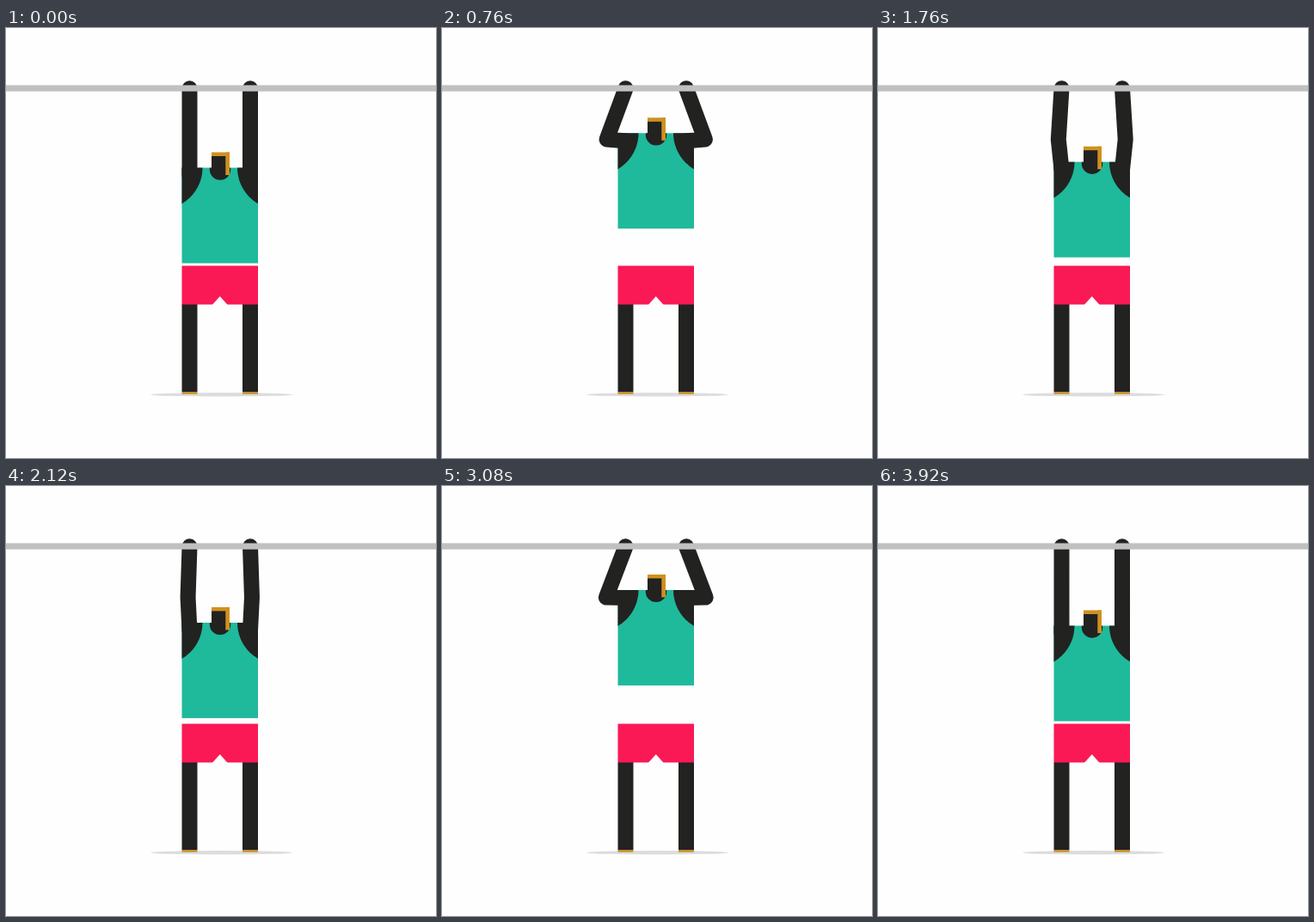
An HTML page with a canvas for the animation above (4 s loop, 500x500 px).

```html
<!DOCTYPE html>
<html lang="en">
<head>
<meta charset="utf-8">
<title>Pull-ups</title>
<style>
  html, body { margin: 0; width: 100%; height: 100%; overflow: hidden; background: #fefefe; }
  canvas { display: block; }
</style>
</head>
<body>
<canvas id="stage" width="500" height="500"></canvas>
<script>
const ctx = document.getElementById('stage').getContext('2d');
const LOOP = 4000, STEP = 40, REP = 59000 / 30;
const LIFT = 42.2, ELBOW_OUT = 23;
const LEFT = 204.5, RIGHT = 293, MID = (LEFT + RIGHT) / 2, LIMB = 18;
const SKIN = '#222221', SHIRT = '#1fb99c', SHORTS = '#fa1955',
      GOLD = '#cf911f', BAR = '#c0c0c0', SHADOW = '#dcdcdc', PAPER = '#fefefe';

const bezier = (s, a, b) => 3 * (1 - s) * (1 - s) * s * a + 3 * (1 - s) * s * s * b + s * s * s;

// Cubic ease with both handles at x = 0.34.
function ease(x) {
  let lo = 0, hi = 1;
  for (let i = 0; i < 30; i++) {
    const s = (lo + hi) / 2;
    if (bezier(s, 0.34, 0.34) < x) lo = s; else hi = s;
  }
  return bezier(lo, 0, 1);
}

function pullAt(t) {
  if (t >= 2 * REP) return 0;
  const phase = (t % REP) / REP;
  return ease(1 - Math.abs(2 * phase - 1));
}

function rect(color, x, y, w, h) {
  ctx.fillStyle = color;
  ctx.fillRect(x, y, w, h);
}

function disc(color, x, y, rx, ry = rx) {
  ctx.fillStyle = color;
  ctx.beginPath();
  ctx.ellipse(x, y, rx, ry, 0, 0, 2 * Math.PI);
  ctx.fill();
}

function polygon(color, points) {
  ctx.fillStyle = color;
  ctx.beginPath();
  points.forEach(([x, y]) => ctx.lineTo(x, y));
  ctx.fill();
}

function drawLegs() {
  disc(SHADOW, 250.5, 426.3, 82.5, 2.2);
  for (const x of [LEFT, RIGHT - LIMB]) {
    rect(SKIN, x, 321, LIMB, 102.5);
    rect(GOLD, x, 423.5, LIMB, 2.2);
  }
  rect(SHORTS, LEFT, 276.5, RIGHT - LEFT, 45);
  polygon(PAPER, [[MID, 312], [MID + 9, 322], [MID - 9, 322]]);
}

function drawTorso(top) {
  const height = 111;
  rect(SHIRT, LEFT, top, RIGHT - LEFT, height);
  ctx.save();
  ctx.beginPath();
  ctx.rect(LEFT, top, RIGHT - LEFT, height);
  ctx.clip();
  disc(SKIN, LEFT - 24.5, top, 48.5);
  disc(SKIN, RIGHT + 24.5, top, 48.5);
  disc(SKIN, 249, top + 2, 12.2);
  ctx.restore();
  rect(SKIN, 239, top - 14, 17, 15);
  rect(GOLD, 239, top - 18, 21, 4.5);
  rect(GOLD, 255.3, top - 18, 4.7, 26.5);
}

function drawArm(side, pull, top) {
  const x = MID + side * (RIGHT - LEFT - LIMB) / 2;
  ctx.strokeStyle = SKIN;
  ctx.lineWidth = LIMB;
  ctx.lineCap = ctx.lineJoin = 'round';
  ctx.beginPath();
  ctx.moveTo(x, 70.3);
  ctx.lineTo(x + side * ELBOW_OUT * pull, 129.6);
  ctx.lineTo(x, top + 9);
  ctx.stroke();
}

function draw(t) {
  const pull = pullAt(t);
  const top = 162.5 - LIFT * pull;
  rect(PAPER, 0, 0, 500, 500);
  drawLegs();
  drawTorso(top);
  drawArm(-1, pull, top);
  drawArm(1, pull, top);
  rect(BAR, 0, 66.5, 500, 7.2);
}

const start = performance.now();
function tick() {
  const t = (performance.now() - start) % LOOP;
  draw(Math.floor(t / STEP) * STEP);
  requestAnimationFrame(tick);
}
tick();
</script>
</body>
</html>
```
